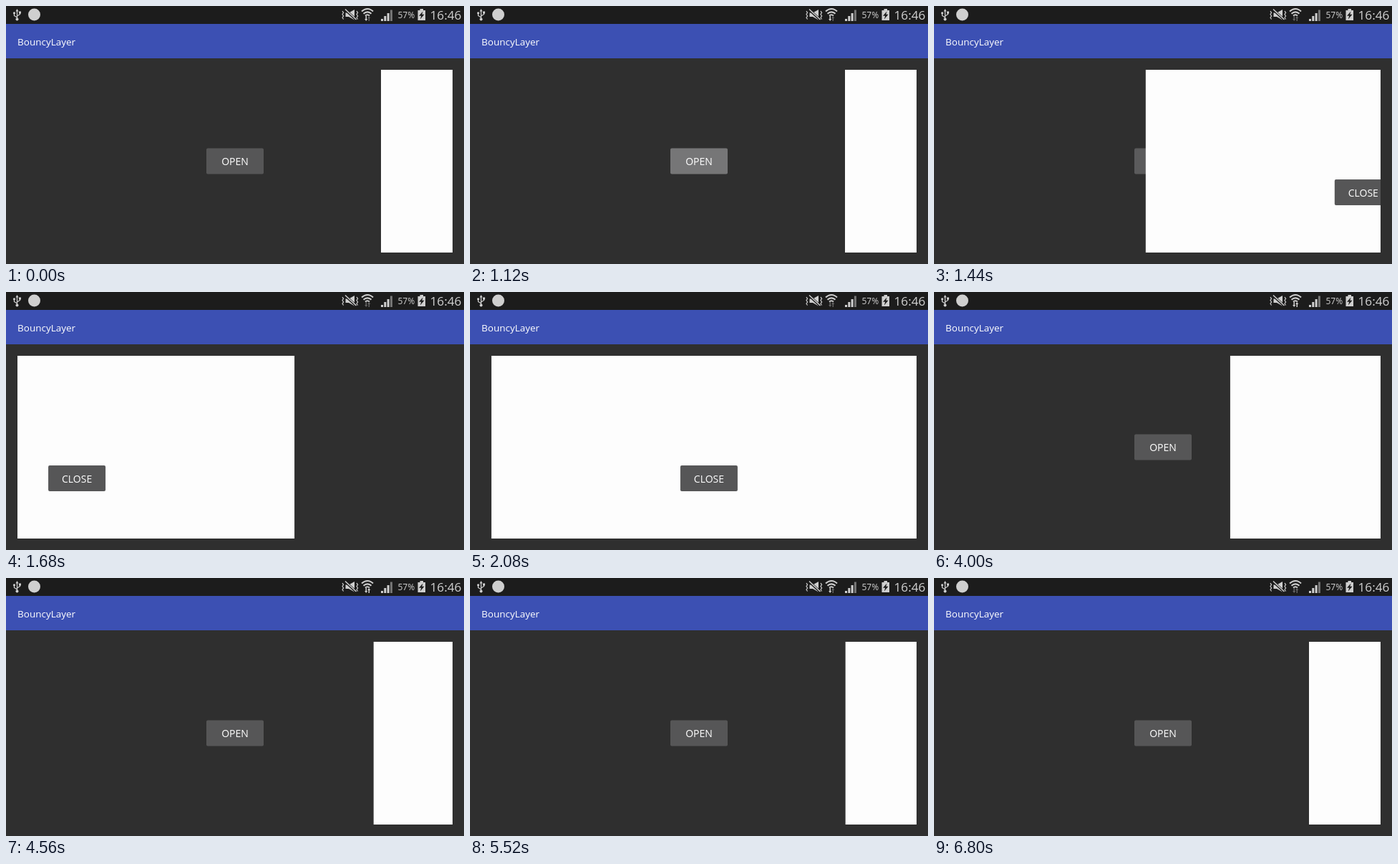
Recreate the animation shown at these times as an HTML page. Size 640 by 360 pixels, loop 6.96 s.

```html
<!DOCTYPE html>
<html lang="en">
<head>
<meta charset="utf-8">
<title>BouncyLayer</title>
<style>
  html, body { margin: 0; width: 100%; height: 100%; overflow: hidden; background: #2f2f2f; }
  svg { display: block; width: 640px; height: 360px; }
  text { font-family: "Open Sans", "Noto Sans", sans-serif; fill: #fff; }
  .label { font-size: 14px; text-anchor: middle; }
  .button { fill: #565657; }
  .press { fill: #fff; opacity: 0; }
  .line { fill: none; stroke: #cfcfcf; }
  .icon { fill: #cfcfcf; }
  .status text { fill: #d2d2d2; }
</style>
</head>
<body>
<svg viewBox="0 0 640 360">
  <defs>
    <clipPath id="frame"><rect x="16" y="89" width="608" height="255"/></clipPath>
  </defs>

  <rect width="640" height="360" fill="#2f2f2f"/>
  <rect y="25" width="640" height="48" fill="#3c50b3"/>
  <text x="16" y="54.5" font-size="13.5">BouncyLayer</text>

  <g class="status">
    <rect width="640" height="25" fill="#1c1c1c"/>
    <!-- USB -->
    <path class="line" stroke-width="1.3" d="M15.5 6V18M15.5 16L11.5 13.5V10.5M15.5 14L19.5 11.5V9"/>
    <path class="icon" d="M15.5 4L17.5 7.5H13.5ZM18 7.5H21V10.5H18Z"/>
    <circle class="icon" cx="11.5" cy="9.8" r="1.6"/>
    <circle class="icon" cx="15.5" cy="18.5" r="2"/>
    <!-- messenger -->
    <circle class="icon" cx="39.5" cy="12" r="8.5"/>
    <!-- muted, vibrating -->
    <path class="icon" d="M474.5 9.5H479L487 5V19.5L479 15H474.5Z"/>
    <path d="M474 5L489 19" stroke="#1c1c1c" stroke-width="3.4"/>
    <path class="line" stroke-width="1.5" d="M474 4.5L489.5 19"/>
    <path class="line" stroke-width="1.2" d="M470 7L471.6 9.3L470 11.6L471.6 14L470 16.3L471.6 18.5M490 7L491.6 9.3L490 11.6L491.6 14L490 16.3L491.6 18.5"/>
    <!-- wifi -->
    <path class="line" stroke-width="2" d="M497 7.5Q505 0.5 513 7.5M499.5 10.7Q505 6 510.5 10.7M502 13.5Q505 11 508 13.5"/>
    <path id="down" class="icon" d="M502.5 14H504V18H505.3L503.2 21L501.1 18H502.5Z"/>
    <path id="up" class="icon" d="M506.5 21H508V17H509.3L507.2 14L505.1 17H506.5Z"/>
    <!-- signal -->
    <path class="icon" d="M524 18H527V21H524ZM528.3 14H531.3V21H528.3ZM532.6 10H535.6V21H532.6Z"/>
    <path fill="#777" d="M536.9 5.5H539.9V21H536.9Z"/>
    <text x="547.5" y="17" font-size="12">57%</text>
    <!-- battery -->
    <path class="icon" d="M578.5 4H583V6H586V20H575.5V6H578.5Z"/>
    <path fill="#1c1c1c" d="M582.5 7.5L577 13.8H580.2L578.8 18.5L584.5 11.8H581.3Z"/>
    <text x="592.5" y="18.5" font-size="17.2">16:46</text>
  </g>

  <rect class="button" x="280" y="198.5" width="80" height="36" rx="2"/>
  <rect id="openPress" class="press" x="280" y="198.5" width="80" height="36" rx="2"/>
  <text class="label" x="320" y="222">OPEN</text>

  <g clip-path="url(#frame)">
    <g id="layer">
      <rect x="16" y="89" width="608" height="255" fill="#fdfdfd"/>
      <rect class="button" x="280" y="242" width="80" height="36" rx="2"/>
      <rect id="closePress" class="press" x="280" y="242" width="80" height="36" rx="2"/>
      <text class="label" x="320" y="265.5">CLOSE</text>
    </g>
  </g>
</svg>
<script>
  const LOOP = 6960, STEP = 80, TRAVEL = 508;
  const OPEN = { start: 1342.7, period: 587.6 };
  const CLOSE = { start: 3404, period: 626 };
  const el = id => document.getElementById(id);
  const within = (t, ...spans) => spans.some(([a, b]) => t >= a && t < b);

  // Damped spring: share of the distance still to go.
  function spring(t, { start, period }) {
    if (t <= start) return 1;
    const a = (t - start) / period * 2 * Math.PI;
    return Math.exp(-0.216 * a - 0.0034 * a * a) * (Math.cos(a) + 0.216 * Math.sin(a));
  }

  // Highlight held from touch to release, then faded out.
  function press(t, down, release, gone) {
    if (t < down || t >= gone) return 0;
    return 0.19 * (t < release ? 1 : (gone - t) / (gone - release));
  }

  function draw(t) {
    const left = t < CLOSE.start ? spring(t, OPEN) : 1 - spring(t, CLOSE);
    el("layer").setAttribute("transform", `translate(${(TRAVEL * left).toFixed(2)} 0)`);
    el("openPress").style.opacity = press(t, 1120, 1340, 1460);
    el("closePress").style.opacity = press(t, 3360, 3440, 3700);
    el("down").style.opacity = within(t, [0, 1200], [2480, 6800]) ? 1 : 0.4;
    el("up").style.opacity = within(t, [2480, 4640], [5360, 5520], [6160, 6240]) ? 1 : 0.4;
  }

  const begin = performance.now();
  function tick() {
    const t = (performance.now() - begin) % LOOP;
    draw(Math.floor(t / STEP) * STEP);
    requestAnimationFrame(tick);
  }
  draw(0);
  requestAnimationFrame(tick);
</script>
</body>
</html>
```
